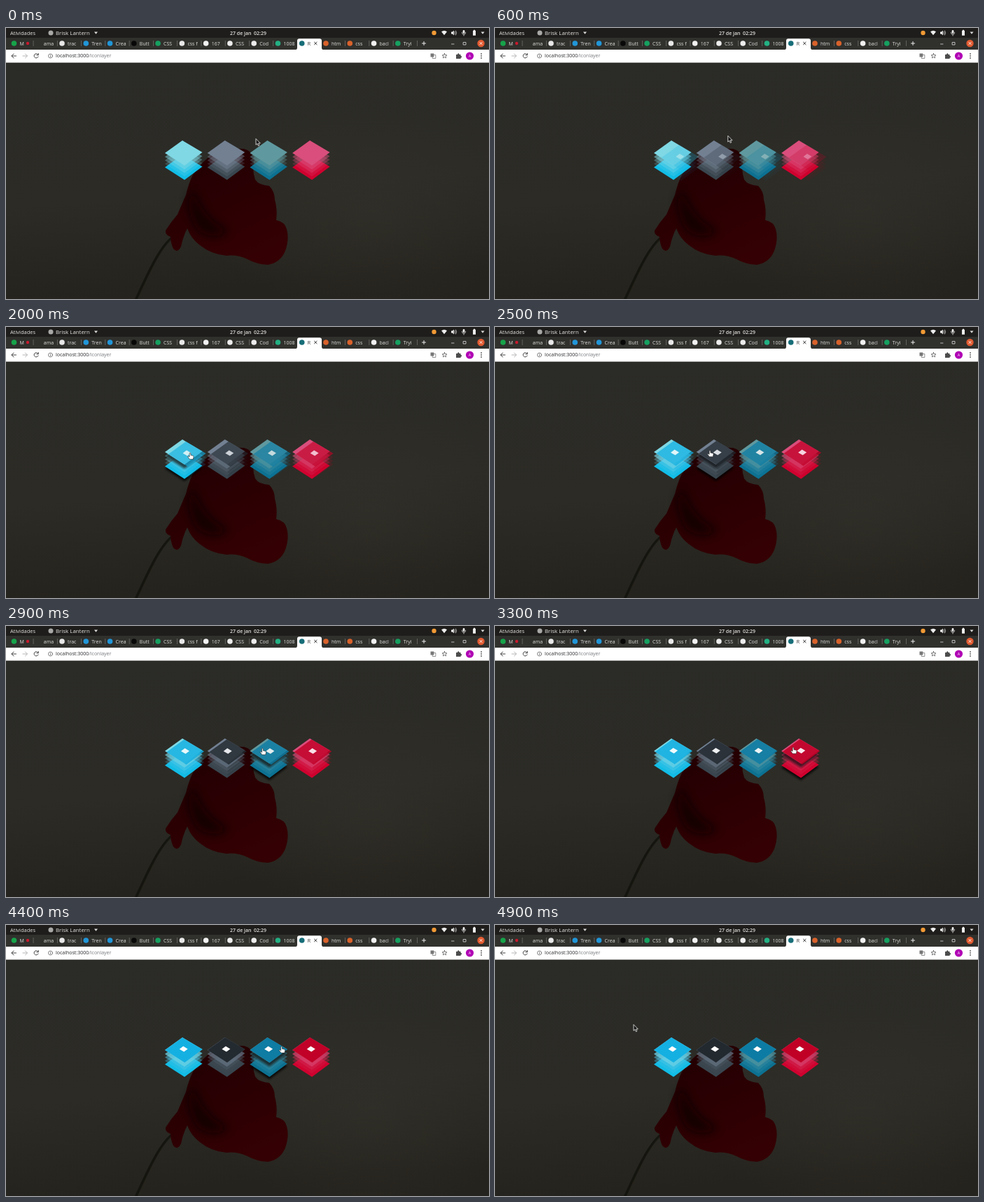
An HTML page for the animation above (5 s loop, 690x388 px).

```html
<!DOCTYPE html>
<html lang="pt">
<head>
<meta charset="utf-8">
<title>Icon layers</title>
<style>
  html, body { margin: 0; width: 100%; height: 100%; overflow: hidden; background: #2c2c27; }
  svg { display: block; width: 690px; height: 388px; }
  text { font: 7px "Open Sans", "Noto Sans", sans-serif; white-space: pre; }
  .bar { fill: #e4e2df; }
  .bold { font-weight: 600; }
  .line { fill: none; stroke-width: 1; stroke-linecap: round; stroke-linejoin: round; }
</style>
</head>
<body>
<svg viewBox="0 0 690 388">
  <defs>
    <linearGradient id="sky" x1="0" y1="0" x2=".15" y2="1">
      <stop offset="0" stop-color="#2b2b27"/>
      <stop offset=".6" stop-color="#2c2b26"/>
      <stop offset="1" stop-color="#25231d"/>
    </linearGradient>
    <radialGradient id="glow">
      <stop offset="0" stop-color="#33312a" stop-opacity=".6"/>
      <stop offset="1" stop-color="#33312a" stop-opacity="0"/>
    </radialGradient>
    <linearGradient id="petal" x1=".1" y1="0" x2=".6" y2="1">
      <stop offset="0" stop-color="#200002"/>
      <stop offset=".5" stop-color="#2a0003"/>
      <stop offset="1" stop-color="#340003"/>
    </linearGradient>
    <filter id="soft" x="-50%" y="-50%" width="200%" height="200%"><feGaussianBlur stdDeviation="7"/></filter>
    <filter id="shade" x="-30%" y="-30%" width="160%" height="160%"><feGaussianBlur stdDeviation="1.8"/></filter>
    <clipPath id="page"><rect y="49" width="690" height="339"/></clipPath>
  </defs>

  <g clip-path="url(#page)">
    <rect y="49" width="690" height="339" fill="url(#sky)"/>
    <ellipse cx="520" cy="260" rx="230" ry="150" fill="url(#glow)"/>
    <path d="M236 301C221 315 211 333 185 390" fill="none" stroke="#15150f" stroke-width="3.6"/>
    <path d="M237 302C223 316 213 334 188 390" fill="none" stroke="#25241b" stroke-width=".8"/>
    <path fill="url(#petal)" d="M340 173Q352 176 355 188Q351 203 356 217Q361 225 376 226Q384 234 384 246
      Q388 260 386 275Q399 278 401 288Q405 302 399 319Q392 336 374 339Q357 338 345 331Q329 324 315 326
      Q293 324 277 311Q264 301 259 287Q253 298 250 313Q245 323 239 316Q235 307 235 299Q227 296 228 290
      Q236 277 245 267Q251 253 257 239Q261 222 267 210Q280 191 296 180Q318 171 340 173Z"/>
    <path d="M262 238Q259 268 274 289Q298 306 318 290Q296 281 283 262Q272 249 270 235Z" fill="#110001" opacity=".8" filter="url(#soft)"/>
    <g id="stacks"></g>
  </g>

  <g id="chrome">
    <rect width="690" height="14" fill="#1e1d1b"/>
    <rect y="14" width="690" height="17" fill="#30302d"/>
    <rect y="31" width="690" height="18.6" fill="#fff"/>
    <text class="bar" x="6" y="9.6" style="font-size:7.5px">Atividades</text>
    <circle cx="64" cy="7" r="3.5" fill="#a9a9a7"/>
    <text class="bar" x="71" y="9.6" style="font-size:7.9px">Brisk Lantern</text>
    <path d="M126 5.5h5l-2.5 3.2z" fill="#ddd"/>
    <text class="bar bold" x="320" y="9.6">27 de jan  02:29</text>
    <circle cx="611.5" cy="7" r="3.2" fill="#f29a35"/>
    <path d="M622 5.3Q626 2 630 5.3L626 10.3Z" fill="#eee"/>
    <path d="M636 5.6h1.8l2-2v7l-2-2H636z" fill="#eee"/>
    <path class="line" d="M641 5.2q1.3 2 0 3.8M642.6 4q2.2 3 0 6" stroke="#ddd" style="stroke-width:.8"/>
    <rect x="652.6" y="3" width="2.8" height="5" rx="1.4" fill="#eee"/>
    <path class="line" d="M651.3 6.3q0 3 2.7 3t2.7-3M654 9.5v1.6" stroke="#ddd" style="stroke-width:.8"/>
    <path d="M667 3.8h1v-1h2v1h1v7h-4z" fill="#eee"/>
    <path d="M678.5 5.5h5l-2.5 3.2z" fill="#ddd"/>

    <path d="M413 31.2q3 0 3-3v-10q0-3 3-3h29q3 0 3 3v10q0 3 3 3z" fill="#fff"/>
    <g id="tabs"></g>
    <circle cx="31" cy="22" r="2.2" fill="#c9192d"/>
    <path class="line" d="M440.5 20.2l3.6 3.6m0-3.6l-3.6 3.6" stroke="#333"/>
    <path class="line" d="M594.5 22h5M597 19.5v5" stroke="#eee"/>
    <path class="line" d="M636.5 23h3.5M653.5 20.5h3.5v3.5h-3.5z" stroke="#ddd" style="stroke-width:.8"/>
    <circle cx="678.5" cy="22" r="5.2" fill="#e25b31"/>
    <path class="line" d="M676.9 20.4l3.2 3.2m0-3.2l-3.2 3.2" stroke="#fff" style="stroke-width:.9"/>

    <path class="line" d="M14.5 40H8m3-3l-3 3 3 3" stroke="#444"/>
    <path class="line" d="M24 40h6.5m-3-3l3 3-3 3" stroke="#b6b6b6"/>
    <path class="line" d="M45.7 38a3.1 3.1 0 1 0 .4 3M46.3 36.5v2.3h-2.3" stroke="#444"/>
    <circle class="line" cx="63.5" cy="40" r="3" stroke="#666" style="stroke-width:.8"/>
    <path class="line" d="M63.5 39.8v1.7M63.5 38.4v.1" stroke="#666" style="stroke-width:.8"/>
    <text x="71" y="42.3" fill="#28292c">localhost:3000<tspan fill="#77797d">/iconlayer</tspan></text>
    <rect x="606.5" y="36.5" width="4.8" height="5" fill="#777"/>
    <path class="line" d="M611.5 38.5h2.3v5h-4.5v-2" stroke="#777" style="stroke-width:.8"/>
    <path class="line" id="star" stroke="#555" style="stroke-width:.8"/>
    <path d="M643 38h2q0-1.700 1.300-1.700t1.300 1.700h2v2q1.500 0 1.500 1.200t-1.500 1.200v1.500H643z" fill="#4c4c4c"/>
    <circle cx="662.5" cy="40" r="5.6" fill="#b000b4"/>
    <text x="662.5" y="42" fill="#fff" text-anchor="middle" style="font-size:5.5px">A</text>
    <g fill="#555"><circle cx="679" cy="37" r=".9"/><circle cx="679" cy="40" r=".9"/><circle cx="679" cy="43" r=".9"/></g>
  </g>

  <g id="cursor">
    <path id="arrow" d="M0 0V8.8L2 7L3.4 10.2L4.9 9.5L3.5 6.5H6.3Z" fill="#151515" stroke="#f2f2f2" stroke-width=".8"/>
    <path id="hand" d="M-.9 .8Q0-.4 .9 .8V3.5L4.3 4.3Q5.2 4.7 5 6L4.3 9.3H-.8L-3.3 5.7Q-3.2 4.5-2 5L-.9 6Z"
      fill="#fff" stroke="#222" stroke-width=".6"/>
  </g>
</svg>

<script>
const LOOP = 5000, STEP = 100, GAP = 60.7, SLIDE = 14;
const $ = id => document.getElementById(id);

function add(parent, tag, attrs) {
  const el = document.createElementNS("http://www.w3.org/2000/svg", tag);
  for (const k in attrs) el.setAttribute(k, attrs[k]);
  return parent.appendChild(el);
}

// Tabs: icon colour, label
const tabs = [
  ["#17a34a", "M"], ["", "ama"], ["#e8e8e8", "trac"], ["#2196d8", "Tren"], ["#2196d8", "Crea"],
  ["#080808", "Butt"], ["#16a060", "CSS"], ["#e8e8e8", "css f"], ["#f2f2f2", "167"], ["#ededed", "CSS"],
  ["#ededed", "Cod"], ["#23b083", "1008"], ["#176d78", "R"], ["#d9622b", "htm"], ["#d9622b", "css "],
  ["#f2f2f2", "bacl"], ["#16a060", "Tryi"]
];
tabs.forEach(([color, label], i) => {
  const x = 11.5 + 34.27 * i, active = i === 12;
  if (color) add($("tabs"), "circle", { cx: x, cy: 22, r: 3.8, fill: color });
  add($("tabs"), "text", { x: x + 8, y: 24.5, fill: active ? "#333" : "#dcdcda" }).textContent = label;
  if (i !== 11 && i !== 12)
    add($("tabs"), "rect", { x: x + 27.2, y: 18, width: .7, height: 8, fill: "#777672" });
});

let star = "";
for (let i = 0; i < 10; i++) {
  const a = i * Math.PI / 5, r = i % 2 ? 1.6 : 3.6;
  star += (i ? "L" : "M") + (626.5 + r * Math.sin(a)) + " " + (40 - r * Math.cos(a));
}
$("star").setAttribute("d", star + "Z");

// Stacks: light, bottom and front colours
const DIAMOND = "M252 161L280.5 178L255 197L227 179Z";
const palette = [
  ["#7fd8e4", "#12bde6", "#14b0e2"],
  ["#728092", "#39454e", "#22292f"],
  ["#5f999f", "#0d7191", "#0d7ca4"],
  ["#d94e7c", "#d0022f", "#c10026"]
];
const stacks = palette.map(([light, deep, front], i) => {
  const g = add($("stacks"), "g", { transform: `translate(${GAP * i})` });
  const layer = (parent, y, fill, opacity) =>
    add(parent, "path", { d: DIAMOND, fill, opacity, transform: `translate(0 ${y})` });
  const shadow = y => {
    const el = layer(g, y, "#000", 0);
    el.setAttribute("filter", "url(#shade)");
    return el;
  };

  const low = shadow(24);
  layer(g, 20.5, deep, 1);
  // Middle layers grow fainter towards the bottom
  const ghosts = [];
  [15.5, 10.5, 5.5].forEach((y, n) => {
    layer(g, y, light, .2 + .15 * n);
    const ghost = add(g, "g", {});
    layer(ghost, y, front, .25);
    ghosts.push(ghost);
  });
  const second = layer(g, 6, light, 0);
  const high = shadow(6);
  layer(g, 0, light, 1);
  const face = add(g, "g", {});
  layer(face, 0, front, 1);
  add(face, "path", { d: "M253 173.5L259.5 177.4L254 181.5L247.500 177.700Z", fill: "#fff" });
  return { low, high, ghosts, second, face };
});

// Pointer tip: time, x, y
const path = [
  [0, 357, 158.5], [1200, 308.5, 150], [2000, 263, 180], [2500, 307, 176.5], [3300, 426, 173.5],
  [3900, 433, 174], [4300, 434, 176], [4800, 232, 165], [4900, 198, 142.5], [5000, 198, 142.5]
];
function pointer(t) {
  const n = path.findIndex(p => p[0] > t), [t0, x0, y0] = path[n - 1], [t1, x1, y1] = path[n];
  const k = (t - t0) / (t1 - t0);
  return [x0 + (x1 - x0) * k, y0 + (y1 - y0) * k];
}

function draw(t) {
  const left = (1 - t / LOOP) ** 2, shown = 1 - left;
  const shift = `translate(${SLIDE * left} ${SLIDE * .6 * left})`;
  const [x, y] = pointer(t);
  let over = false;
  stacks.forEach((s, i) => {
    const dx = Math.abs(x - 254 - GAP * i);
    const hover = dx < 27 && y > 161 + dx * .67;
    over = over || hover;
    for (const el of [s.face, ...s.ghosts]) {
      el.setAttribute("transform", shift);
      el.setAttribute("opacity", shown);
    }
    s.second.setAttribute("opacity", shown * .4);
    s.low.setAttribute("opacity", hover ? .75 : 0);
    s.high.setAttribute("opacity", hover ? .65 : 0);
  });
  $("cursor").setAttribute("transform", `translate(${x} ${y})`);
  $("arrow").setAttribute("visibility", over ? "hidden" : "visible");
  $("hand").setAttribute("visibility", over ? "visible" : "hidden");
}

const start = performance.now();
function tick() {
  const t = (performance.now() - start) % LOOP;
  draw(Math.floor(t / STEP) * STEP);
  requestAnimationFrame(tick);
}
tick();
</script>
</body>
</html>
```
